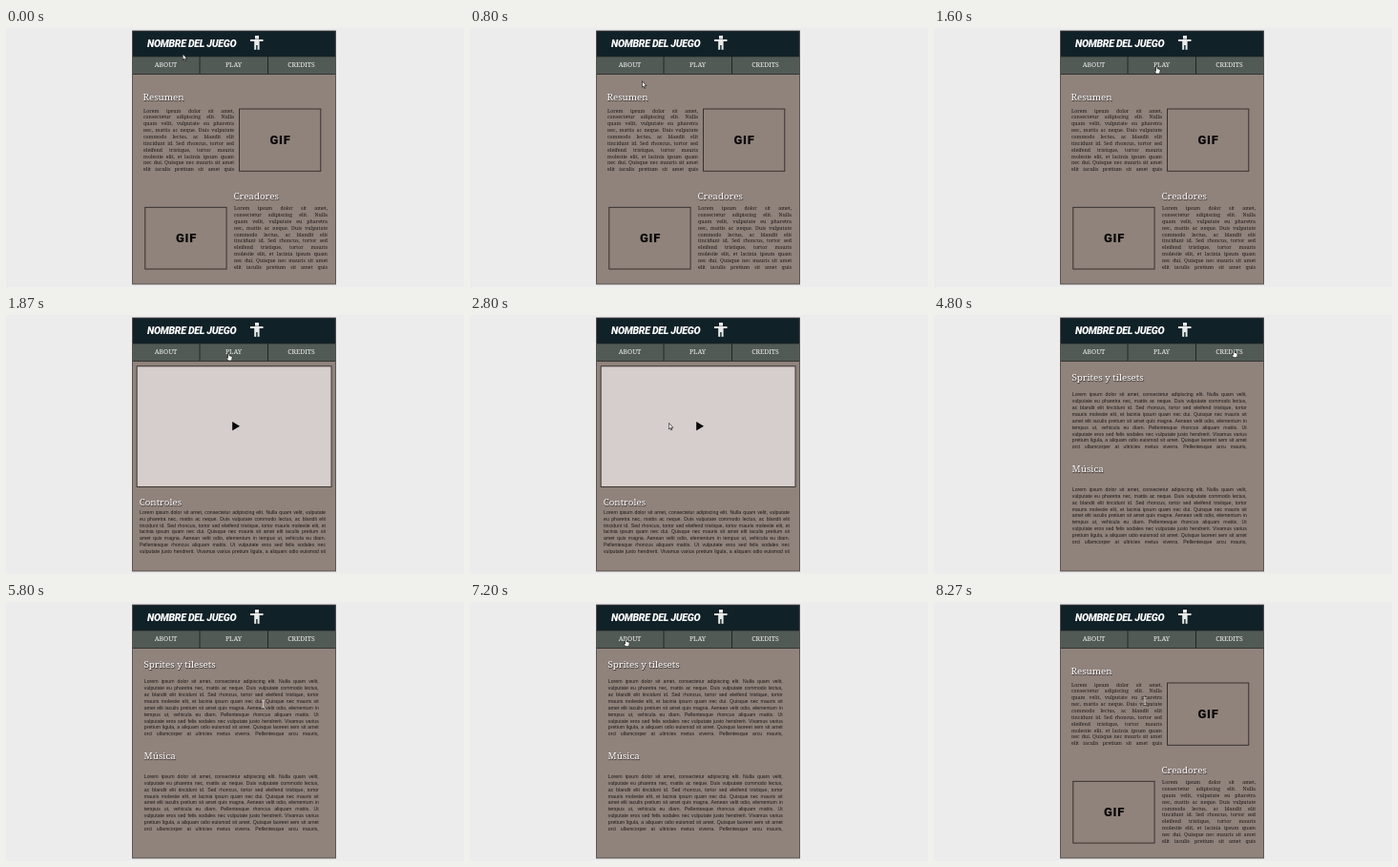
Write an HTML page with a canvas that moves like this. It is 480x272 px and loops after 8.59 s.

```html
<!DOCTYPE html>
<html lang="es">
<head>
<meta charset="utf-8">
<title>Nombre del juego</title>
<style>
html, body { margin: 0; width: 100%; height: 100%; overflow: hidden; background: #ececec; }
#stage { position: relative; width: 480px; height: 272px; overflow: hidden; }
canvas, .page { position: absolute; left: 0; top: 0; width: 480px; height: 272px; }
.page { visibility: hidden; }
.page.on { visibility: visible; }
.t { position: absolute; white-space: nowrap; }
.title { font: italic 900 10.6px/14px Roboto, sans-serif; letter-spacing: -.3px; color: #fff; }
.nav { width: 72px; text-align: center; font: 500 6.9px/10px "Noto Serif", serif; color: #f4f4f2; }
.head { font: 500 9.8px/14px "Noto Serif", serif; color: #fff; text-shadow: .5px .8px 1px #2b2422; }
.gif { width: 86px; text-align: center; font: 900 13px/16px Roboto, sans-serif; letter-spacing: .7px; color: #080706; }
.line { height: 6.85px; text-align: justify; text-align-last: justify; color: #1d1715; }
.serif { font: 5.2px/6.85px "Noto Serif", serif; }
.sans { font: 5.2px/6.85px "Liberation Sans", Arial, sans-serif; }
</style>
</head>
<body>
<div id="stage">
  <canvas id="back"></canvas>
  <div id="bar"></div>
  <div class="page" id="about"></div>
  <div class="page" id="play"></div>
  <div class="page" id="credits"></div>
  <canvas id="front"></canvas>
</div>
<script>
const LOOP = 8590, STEP = 1000 / 15, SCALE = 2;
const $ = id => document.getElementById(id);

const WORDS = ("Lorem ipsum dolor sit amet, consectetur adipiscing elit. Nulla quam velit, " +
  "vulputate eu pharetra nec, mattis ac neque. Duis vulputate commodo lectus, ac blandit elit " +
  "tincidunt id. Sed rhoncus, tortor sed eleifend tristique, tortor mauris molestie elit, et " +
  "lacinia ipsum quam nec dui. Quisque nec mauris sit amet elit iaculis pretium sit amet quis " +
  "magna. Aenean velit odio, elementum in tempus ut, vehicula eu diam. Pellentesque rhoncus " +
  "aliquam mattis. Ut vulputate eros sed felis sodales nec vulputate justo hendrerit. Vivamus " +
  "varius pretium ligula, a aliquam odio euismod sit amet. Quisque laoreet sem sit amet orci " +
  "ullamcorper at ultricies metus viverra. Pellentesque arcu mauris,").split(" ");

function label(parent, kind, x, y, text) {
  const el = document.createElement("div");
  el.className = "t " + kind;
  el.style.left = x + "px";
  el.style.top = y + "px";
  el.textContent = text;
  $(parent).append(el);
  return el;
}

// Justified paragraph; counts holds the words on each line.
function paragraph(parent, font, x, y, width, counts) {
  let at = 0;
  counts.forEach((n, i) => {
    const text = WORDS.slice(at, at += n).join(" ");
    label(parent, "line " + font, x, y + i * 6.85, text).style.width = width + "px";
  });
}

function buildText() {
  const narrow = [5, 4, 5, 6, 5, 6, 4, 6, 7, 6];
  const middle = [11, 11, 12, 13, 13, 10, 11, 13, 9];
  const wide = [12, 13, 13, 14, 13, 11, 12];

  label("bar", "title", 148, 9.5, "NOMBRE DEL JUEGO");
  label("bar", "nav", 131.5, 33.7, "ABOUT");
  label("bar", "nav", 202.5, 33.7, "PLAY");
  label("bar", "nav", 273.5, 33.7, "CREDITS");

  label("about", "head", 143.5, 65.5, "Resumen");
  paragraph("about", "serif", 144, 83.6, 95, narrow);
  label("about", "gif", 244.5, 110, "GIF");
  label("about", "head", 238.5, 169.5, "Creadores");
  paragraph("about", "serif", 239, 186.2, 98, narrow);
  label("about", "gif", 146, 213, "GIF");

  label("play", "head", 139.7, 189.5, "Controles");
  paragraph("play", "sans", 140, 203.8, 195, wide);

  label("credits", "head", 144.5, 58.8, "Sprites y tilesets");
  paragraph("credits", "sans", 144.8, 80.4, 183, middle);
  label("credits", "head", 144.5, 154.8, "Música");
  paragraph("credits", "sans", 144.8, 180, 183, middle);
}

function context(id) {
  const c = $(id);
  c.width = 480 * SCALE;
  c.height = 272 * SCALE;
  const g = c.getContext("2d");
  g.scale(SCALE, SCALE);
  return g;
}

function rect(g, x, y, w, h, fill) {
  g.fillStyle = fill;
  g.fillRect(x, y, w, h);
}

function frame(g, x, y, w, h, fill) {
  rect(g, x, y, w, h, fill);
  g.strokeStyle = "#2f2926";
  g.lineWidth = .9;
  g.strokeRect(x, y, w, h);
}

function shape(g, points, fill, line) {
  g.beginPath();
  points.forEach(([x, y]) => g.lineTo(x, y));
  g.closePath();
  g.fillStyle = fill;
  g.fill();
  if (line) {
    g.strokeStyle = line;
    g.lineWidth = .6;
    g.stroke();
  }
}

function person(g) {
  const c = "#e9eaea";
  rect(g, 261, 8, 4, 3.6, c);
  rect(g, 256, 12, 13.5, 2, c);
  rect(g, 260.2, 12, 5.4, 6, c);
  rect(g, 260.2, 18, 2, 4.8, c);
  rect(g, 263.6, 18, 2, 4.8, c);
}

function drawPage(g, page) {
  rect(g, 0, 0, 480, 272, "#ececec");
  rect(g, 132.5, 3, 213, 266, "#90837c");
  rect(g, 132.5, 3, 213, 27, "#112128");
  rect(g, 132.5, 30, 213, 18.5, "#525a56");
  for (const x of [203, 274.5]) rect(g, x - .4, 30, .9, 18.5, "#1b2423");
  rect(g, 132.5, 29.5, 213, .8, "#1b2423");
  rect(g, 132.5, 48, 213, .9, "#2b2c2a");
  g.strokeStyle = "#473f3c";
  g.lineWidth = .8;
  g.strokeRect(132.5, 3, 213, 266);
  person(g);
  if (page === "about") {
    frame(g, 244.5, 85, 85.3, 65.3, "#90837c");
    frame(g, 145.8, 188.3, 85.3, 64.8, "#90837c");
  }
  if (page === "play") {
    frame(g, 137.2, 53.8, 203.8, 126.6, "#d6cecc");
    shape(g, [[237.2, 112], [245, 116.7], [237.2, 121.4]], "#050505");
  }
}

// Start, end, and the two resting points of each pointer move.
const MOVES = [
  [0, 867, 185.3, 27.3, 180.5, 56.5],
  [867, 1600, 180.5, 56.5, 233.3, 40.3],
  [2067, 2800, 233.3, 40.3, 208.5, 113.6],
  [3400, 4200, 208.5, 113.6, 314.3, 37],
  [5000, 5800, 314.3, 37, 269.5, 107],
  [6533, 7200, 269.5, 107, 163.3, 39],
  [7600, 8267, 163.3, 39, 221, 104]
];

function pointerAt(t) {
  let [, , x, y] = MOVES[0];
  for (const [t0, t1, x0, y0, x1, y1] of MOVES) {
    if (t < t0) break;
    const p = Math.min(1, (t - t0) / (t1 - t0));
    const e = p * p * (3 - 2 * p);
    x = x0 + (x1 - x0) * e;
    y = y0 + (y1 - y0) * e;
  }
  return [x, y];
}

const inside = (x, y, l, t, r, b) => x > l && x < r && y > t && y < b;

function overText(page, x, y) {
  if (page === "about") return inside(x, y, 144, 84, 239, 152);
  return page === "credits" && inside(x, y, 145, 80, 328, 142);
}

function arrow(g) {
  shape(g, [[0, 0], [0, 6.2], [1.4, 5], [2.4, 7.3], [3.4, 6.9], [2.4, 4.7], [4.3, 4.6]], "#fff", "#222");
}

function hand(g) {
  shape(g, [[-.6, 0], [.6, 0], [.8, 2.6], [3.4, 3.2], [3.8, 4], [3.2, 7.6], [-.5, 7.6],
    [-2.3, 4.8], [-1.6, 4.2], [-.7, 5]], "#fff", "#222");
}

function beam(g) {
  const c = "#d5cfcb";
  rect(g, -.35, -3.6, .8, 7.2, c);
  rect(g, -1.4, -3.9, 2.9, .7, c);
  rect(g, -1.4, 3.3, 2.9, .7, c);
}

function drawPointer(g, page, x, y) {
  g.clearRect(0, 0, 480, 272);
  g.save();
  g.translate(x, y);
  const draw = y > 30 && y < 48 ? hand : overText(page, x, y) ? beam : arrow;
  draw(g);
  g.restore();
}

function pageAt(t) {
  if (t < 1865 || t >= 7598) return "about";
  return t < 4798 ? "play" : "credits";
}

buildText();
const back = context("back"), front = context("front");
const start = performance.now();
let shown = "";

function render() {
  const t = (performance.now() - start) % LOOP;
  const page = pageAt(t);
  if (page !== shown) {
    shown = page;
    drawPage(back, page);
    for (const id of ["about", "play", "credits"]) $(id).classList.toggle("on", id === page);
  }
  const [x, y] = pointerAt(Math.floor((t + 2) / STEP) * STEP);
  drawPointer(front, page, x, y);
  requestAnimationFrame(render);
}
render();
</script>
</body>
</html>
```
